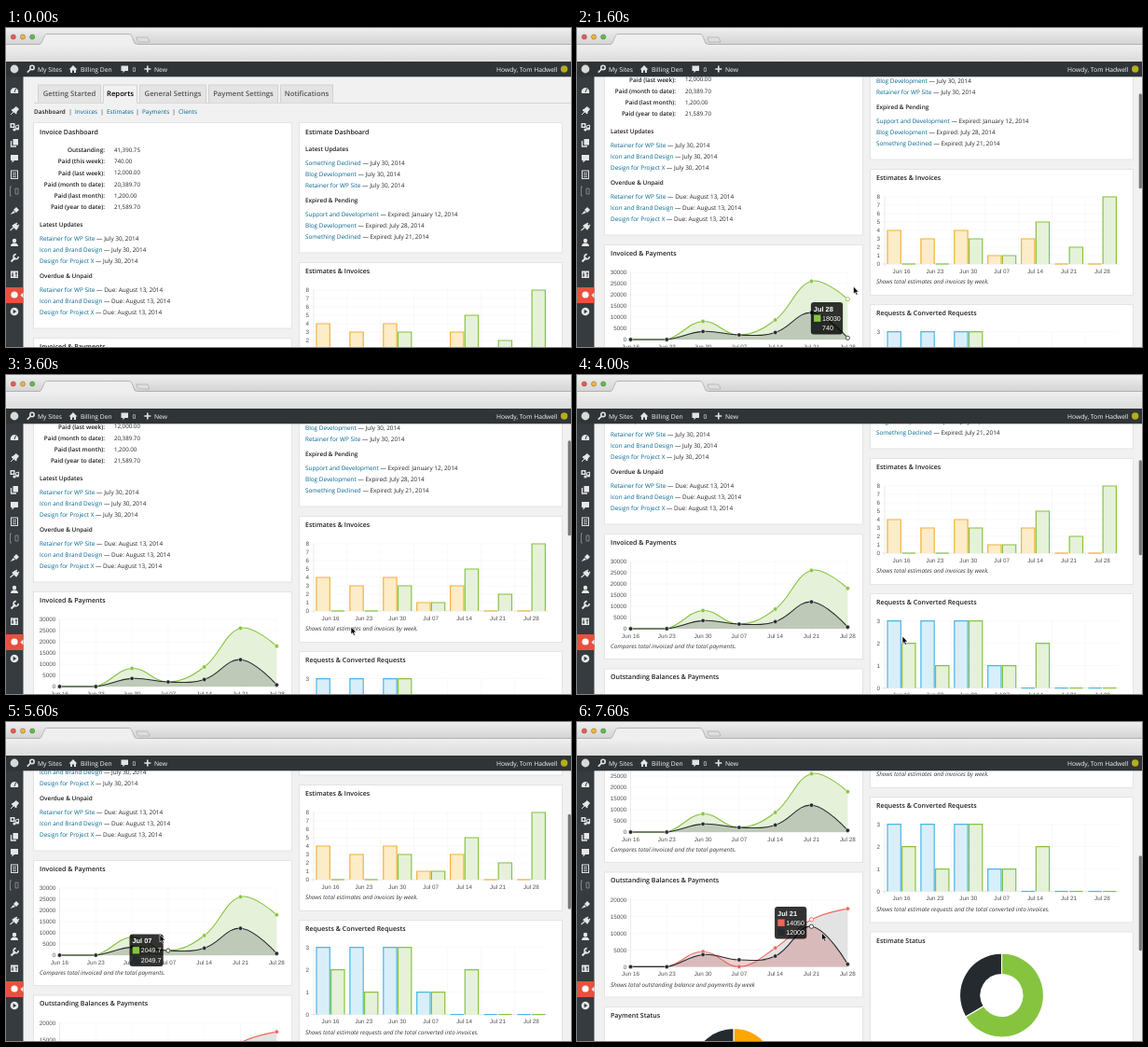
An HTML page for the animation above (8 s loop, 606 by 342 pixels).

```html
<!DOCTYPE html>
<html lang="en">
<head>
<meta charset="utf-8">
<title>Reports dashboard</title>
<style>
html, body { margin: 0; width: 100%; height: 100%; overflow: hidden; background: #f1f1f1; }
svg { display: block; width: 606px; height: 342px; }
text { font-family: "Open Sans", sans-serif; font-size: 6.4px; fill: #242424; white-space: pre; text-rendering: geometricPrecision; }
.b { font-weight: 600; fill: #1c1c1c; }
.h { font-size: 7px; font-weight: 600; fill: #1c1c1c; }
.tab { font-size: 7.7px; font-weight: 600; fill: #555; }
.on { fill: #000; }
.a { fill: #00648f; }
.i { font-style: italic; font-size: 6.3px; fill: #363636; }
.v { font-size: 6.2px; }
.bar { font-size: 6.75px; fill: #f6f6f6; }
.ax { font: 6.3px "Liberation Sans", Arial, sans-serif; fill: #505050; }
.tt { font: bold 7.4px "Liberation Sans", Arial, sans-serif; fill: #fff; }
.tr { font: 7.1px "Liberation Sans", Arial, sans-serif; fill: #fff; }
.e { text-anchor: end; }
.m { text-anchor: middle; }
</style>
</head>
<body>
<svg id="stage" viewBox="0 0 606 342"></svg>
<script>
const DARK = '#252a2f', GREEN = '#86c440', RED = '#ef675b', ORANGE = '#f0b23c', BLUE = '#4db5e4';
const PALE = { [GREEN]: '#e6f1d9', [ORANGE]: '#fdecc8', [BLUE]: '#d8effa' };
const DAYS = ['Jun 16', 'Jun 23', 'Jun 30', 'Jul 07', 'Jul 14', 'Jul 21', 'Jul 28'];
const PLOT = 72;
const SIZES = { h: 7, tab: 7.7, i: 6.3, v: 6.2, bar: 6.75, ax: 6.3, tt: 7.4, tr: 7.1 };

// y is the optical middle of the line
function text(x, y, s, cls = '') {
  const size = SIZES[cls.split(' ')[0]] || 6.4;
  return `<text x="${x}" y="${(y + size * .36).toFixed(2)}" class="${cls}">${s.replace(/&/g, '&amp;')}</text>`;
}
const rect = (x, y, w, h, fill, more = '') =>
  `<rect x="${x}" y="${y}" width="${w}" height="${h}" fill="${fill}" ${more}/>`;
const path = (d, fill, stroke = 'none', w = 1) =>
  `<path d="${d}" fill="${fill}" stroke="${stroke}" stroke-width="${w}"/>`;
const dot = (x, y, r, fill, stroke = 'none', w = 1) =>
  `<circle cx="${x}" cy="${y}" r="${r}" fill="${fill}" stroke="${stroke}" stroke-width="${w}"/>`;
const panel = (x, y, w, h, title, ty) =>
  rect(x + .5, y + .5, w - 1, h - 1, '#fff', 'stroke="#e4e4e4"') + text(x + 7, ty, title, 'h');

const paid = [0, 0, 3600, 2049.7, 3150, 12000, 740];
const charts = {
  invoiced: {
    zero: 434, top: 30000, step: 5000, sets: [
      { v: [0, 0, 8100, 2049.7, 8750, 26050, 18030], c: GREEN, fill: '#e6f1d9' },
      { v: paid, c: DARK, fill: 'rgba(37,42,47,.2)' }]
  },
  owed: {
    zero: 578.4, top: 20000, step: 5000, sets: [
      { v: [0, 0, 4500, 0, 5600, 14050, 17290], c: RED, fill: '#e3e3e3' },
      { v: paid, c: DARK, fill: 'rgba(190,80,80,.28)' }]
  },
  estimates: {
    bars: true, zero: 353, top: 8, step: 1, sets: [
      { v: [4, 3, 4, 1, 3, 0, 0], c: ORANGE }, { v: [0, 0, 3, 1, 5, 2, 8], c: GREEN }]
  },
  requests: {
    bars: true, zero: 497.6, top: 3, step: 1, sets: [
      { v: [3, 3, 3, 1, 0, 0, 0], c: BLUE }, { v: [2, 1, 3, 1, 2, 0, 0], c: GREEN }]
  }
};
const px = (c, i) => c.bars ? 348 + 35.9 * i : 57.5 + 38.8 * i;
const py = (c, v) => c.zero - v / c.top * PLOT;

function axes(c) {
  const left = c.bars ? 330 : 57.5, right = c.bars ? 581.5 : 290.3;
  const tone = first => `rgba(0,0,0,${first ? .12 : .04})`;
  let s = '';
  for (let v = 0; v <= c.top; v += c.step) {
    const y = py(c, v);
    s += path(`M${left - 3} ${y}H${right}`, 'none', tone(v === 0), .7);
    s += text(c.bars ? 325 : 53.2, y, String(v), 'ax e');
  }
  DAYS.forEach((d, i) => {
    const x = c.bars ? left + 35.9 * i : px(c, i);
    s += path(`M${x} ${c.zero - PLOT}V${c.zero + 2.5}`, 'none', tone(i === 0), .7);
    s += text(px(c, i), c.zero + 7.5, d, 'ax m');
  });
  return s;
}

// smooth line whose handles stay inside the plot
function curve(c, vals) {
  const p = vals.map((v, i) => [px(c, i), py(c, v)]);
  const clamp = y => Math.max(c.zero - PLOT, Math.min(c.zero, y));
  const handles = p.map((q, i) => {
    const a = p[i - 1] || q, b = p[i + 1] || q;
    const t = a === q || b === q ? 0 : .4;
    const da = Math.hypot(q[0] - a[0], q[1] - a[1]), db = Math.hypot(b[0] - q[0], b[1] - q[1]);
    const fa = t * da / (da + db), fb = t * db / (da + db);
    const dx = b[0] - a[0], dy = b[1] - a[1];
    return [[q[0] - fa * dx, clamp(q[1] - fa * dy)], [q[0] + fb * dx, clamp(q[1] + fb * dy)]];
  });
  return 'M' + p[0] + p.slice(1).map((q, i) => `C${handles[i][1]} ${handles[i + 1][0]} ${q}`).join('');
}

function chart(c) {
  let s = axes(c);
  c.sets.forEach((set, k) => {
    if (c.bars) {
      set.v.forEach((v, i) => {
        const x = px(c, i) + (k ? .7 : -15);
        s += path(`M${x} ${c.zero}V${py(c, v)}h14.3V${c.zero}`, PALE[set.c], set.c, 1.2);
      });
    } else {
      const d = curve(c, set.v);
      s += path(`${d}V${c.zero}H57.5Z`, set.fill) + path(d, 'none', set.c, 1.1);
      set.v.forEach((v, i) => s += dot(px(c, i), py(c, v), 2.2, set.c, '#fff', .5));
    }
  });
  return s;
}

function tip(name, i) {
  const c = charts[name], x = px(c, i), ys = c.sets.map(set => py(c, set.v[i]));
  const wide = s => [...s].reduce((w, ch) => w + (ch === '.' ? .278 : .556), 0) * SIZES.tr;
  const w = Math.max(28, ...c.sets.map(set => wide(String(set.v[i])) + 14.5));
  const left = c.bars ? x + 13.2 : x - 5.2 - w, top = (ys[0] + ys[1]) / 2 - 17.5;
  let s = '';
  if (!c.bars) c.sets.forEach((set, k) => s += dot(x, ys[k], 2.1, '#fff', set.c, .8));
  s += rect(left, top, w, 34.4, 'rgba(0,0,0,.8)', 'rx="3"') + text(left + 3, top + 7, DAYS[i], 'tt');
  c.sets.forEach((set, k) => {
    const y = top + 17.2 + k * 10.3;
    s += rect(left + 3.2, y - 3.7, 7.4, 7.4, PALE[c.bars && set.c] || set.c, c.bars ? `stroke="${set.c}" stroke-width=".8"` : '');
    s += text(left + 12.2, y, String(set.v[i]), 'tr');
  });
  return s;
}

function donut(x, y, share, first) {
  const slice = (a, b, fill) => {
    const at = (r, t) => [x + r * Math.sin(t * 2 * Math.PI), y - r * Math.cos(t * 2 * Math.PI)];
    const big = b - a > .5 ? 1 : 0;
    return path(`M${at(45, a)}A45 45 0 ${big} 1 ${at(45, b)}L${at(22.5, b)}A22.5 22.5 0 ${big} 0 ${at(22.5, a)}Z`, fill, '#fff', 1.1);
  };
  return slice(0, share, first) + slice(share, 1, DARK);
}

function list(x, y, title, rows) {
  return text(x, y, title, 'b') + rows.map(([name, rest], k) =>
    `<text x="${x}" y="${y + 17.9 + 12 * k}"><tspan class="a">${name}</tspan> — ${rest}</text>`).join('');
}

function page() {
  let s = path('M30 80.5H606', 'none', '#d2d2d2');
  [[34, 68, 'Getting Started'], [104, 37, 'Reports'], [143, 72, 'General Settings'],
   [217, 75, 'Payment Settings'], [294, 57, 'Notifications']].forEach(([x, w, name], i) => {
    const on = i === 1;
    s += rect(x + .5, 61, w - 1, on ? 20.5 : 19.5, on ? '#f1f1f1' : '#e4e4e4');
    s += path(`M${x + .5} 80V61H${x + w - .5}V80`, 'none', '#d2d2d2');
    s += text(x + w / 2, 70.5, name, 'tab m' + (on ? ' on' : ''));
  });
  s += text(30, 90, 'Dashboard', 'b');
  [[74, 'Invoices'], [108, 'Estimates'], [146, 'Payments'], [185, 'Clients']].forEach(([x, name]) =>
    s += text(x - 5, 90, '|', 'm') + text(x, 90, name, 'a'));

  s += panel(29, 101, 278, 221.5, 'Invoice Dashboard', 111);
  [['Outstanding:', '41,390.75'], ['Paid (this week):', '740.00'], ['Paid (last week):', '12,000.00'],
   ['Paid (month to date):', '20,389.70'], ['Paid (last month):', '1,200.00'], ['Paid (year to date):', '21,589.70']]
    .forEach(([name, sum], k) => s += text(106, 131 + 12.1 * k, name, 'b e') + text(116, 131 + 12.1 * k, sum, 'v'));
  const jobs = ['Retainer for WP Site', 'Icon and Brand Design', 'Design for Project X'];
  s += list(36, 210.5, 'Latest Updates', jobs.map(n => [n, 'July 30, 2014']));
  s += list(36, 265.5, 'Overdue & Unpaid', jobs.map(n => [n, 'Due: August 13, 2014']));

  s += panel(314, 101, 283, 140.5, 'Estimate Dashboard', 111);
  s += list(321, 129.5, 'Latest Updates', ['Something Declined', 'Blog Development', 'Retainer for WP Site'].map(n => [n, 'July 30, 2014']));
  s += list(321, 184.5, 'Expired & Pending', [['Support and Development', 'Expired: January 12, 2014'],
    ['Blog Development', 'Expired: July 28, 2014'], ['Something Declined', 'Expired: July 21, 2014']]);

  s += panel(314, 251, 283, 136, 'Estimates & Invoices', 260.8) + chart(charts.estimates);
  s += text(321, 372, 'Shows total estimates and invoices by week.', 'i');
  s += panel(314, 396, 283, 135.5, 'Requests & Converted Requests', 405.5) + chart(charts.requests);
  s += text(321, 516.5, 'Shows total estimate requests and the total converted into invoices.', 'i');
  s += panel(314, 540.5, 283, 140, 'Estimate Status', 550) + donut(455.5, 609, .665, GREEN);

  s += panel(29, 332, 278, 135, 'Invoiced & Payments', 341.5) + chart(charts.invoiced);
  s += text(36, 452.7, 'Compares total invoiced and the total payments.', 'i');
  s += panel(29, 476.5, 278, 135, 'Outstanding Balances & Payments', 485.7) + chart(charts.owed);
  s += text(36, 597.3, 'Shows total outstanding balance and payments by week', 'i');
  s += panel(29, 621, 278, 140, 'Payment Status', 630.4) + donut(168, 689.5, .55, '#fda604');
  return s;
}

function sidebar() {
  const g = '#e6e8e8', bg = '#363b3f';
  const at = (y, s) => `<g transform="translate(9 ${y})">${s}</g>`;
  const pin = path('M-4 4L-1 1M-3 -1L2 3L2 1L4.500 -2L2 -4.500L-1 -2Z', g, g, 1);
  return rect(0, 52, 18.5, 290, bg) +
    at(67, path('M-4 3A4.300 4.300 0 1 1 4 3Z', g) + path('M0 2L1.500 -2', 'none', bg, 1)) +
    at(89, pin) +
    at(106, rect(-4.5, -4, 5, 5, g) + dot(-2, -1.5, 1.2, bg) + dot(0, 3, 1.6, g) + dot(3.5, 2, 1.6, g) + path('M1.300 3V-1L4.600 -2V2', 'none', g, 1)) +
    at(123, rect(-1.5, -4, 5.5, 6.5, g) + path('M-3.500 -2V4H2', 'none', g, 1.3)) +
    at(140, path('M-4 -4H4V2H0L-2.500 4.500V2H-4Z', g)) +
    at(157, rect(-3.5, -4, 7, 8.5, 'none', `stroke="${g}"`) + path('M-2 -1.500H2M-2 .5H2M-2 2.500H2', 'none', g, .8)) +
    at(175, path('M-3 -5H-4.500V5H-3M1 -3H4V3H1Z', 'none', '#8b8e90', .9)) +
    at(196, path('M-4.500 4L-1 0L1 2ZM-1 -1L2 -4L5 -1L2 2Z', g)) +
    at(213, path('M-4.500 4L-1 1M-2 -1L2 3L4 0L1 -3ZM1 -2L3 -4M3 0L5 -2', g, g, 1.1)) +
    at(230, dot(0, -2, 2.2, g) + path('M-4 4Q-4 .5 0 .5T4 4Z', g)) +
    at(247, path('M-3.500 3.500L1 -1', 'none', g, 2.2) + path('M4.200 -2A2.600 2.600 0 1 1 1.700 -4.400', 'none', g, 1.6)) +
    at(264, rect(-4, -3.5, 8, 7.5, g) + path('M-2 -2V3M2 -2V3M-3.300 1H-.7M.7 -1H3.300', 'none', bg, .9)) +
    rect(0, 278, 18.5, 17, '#e8503f') + dot(9, 286, 3.6, '#fff') + path('M18.500 283.500L15.500 286.500L18.500 289.500Z', '#f1f1f1') +
    at(304, dot(0, 0, 4.3, g) + path('M-1.300 -2.200L2.300 0L-1.300 2.200Z', bg));
}

function frameTop() {
  const g = '#e2e4e4';
  let s = rect(0, 0, 606, 18, 'url(#strip)') + rect(0, 18, 606, 18, 'url(#tools)');
  s += path('M0 17.500H36Q38 17 39.500 13L41 9Q42 6.500 44 6.500H132Q134 6.500 135 9L137 14Q138 17.500 141 17.500H606', 'none', '#a9a9a9', .8);
  s += path('M36.500 18Q38.500 17 39.700 13.500L41.300 9.500Q42 7 44 7H132Q134 7 134.700 9.500L136.500 14.500Q137.500 18 141 18Z', '#efefef');
  s += path('M140 10H151Q152 10 152.500 11L154 15H143Q141.500 15 141 13.500Z', '#dedede', '#aaa', .7);
  ['#ee5b52', '#f2b63c', '#5fbf4a'].forEach((c, k) => s += dot(7.8 + 10.2 * k, 9.5, 2.6, c, 'rgba(0,0,0,.35)', .7));
  s += rect(0, 36, 606, 16.3, '#2f3437') + dot(9, 44, 4.4, '#d8dada');
  s += dot(28, 42.5, 2.2, 'none', g, 1.6) + path('M26.500 44L22.800 47.700', 'none', g, 1.7);
  s += path('M67.500 44.500L72 40L76.500 44.500H75V48H73V45.500H71V48H69V44.500Z', g);
  s += path('M123.500 40.500H131V46H127.500L125.500 48.300V46H123.500Z', g);
  s += path('M148.300 44H155.300M151.800 40.500V47.500', 'none', g, 1.6);
  s += text(34, 44.3, 'My Sites', 'bar') + text(80, 44.3, 'Billing Den', 'bar') + text(135.5, 44.3, '0', 'bar') + text(159, 44.3, 'New', 'bar');
  s += text(591.5, 44.3, 'Howdy, Tom Hadwell', 'bar e') + dot(598.7, 44, 3.7, '#b5ae1c');
  return s;
}

const stage = document.getElementById('stage');
stage.innerHTML = `<defs>
<linearGradient id="strip" x2="0" y2="1"><stop stop-color="#eee"/><stop offset="1" stop-color="#d3d3d3"/></linearGradient>
<linearGradient id="tools" x2="0" y2="1"><stop stop-color="#efefef"/><stop offset="1" stop-color="#dcdcdc"/></linearGradient>
</defs>${rect(0, 0, 606, 342, '#f1f1f1')}
<g id="doc">${page()}<g id="tip"></g></g>
${rect(602.7, 0, 3.2, 102, 'rgba(0,0,0,.5)', 'id="thumb" rx="1.6"')}
${sidebar()}${frameTop()}
<path id="arrow" d="M0 0V8L1.800 6.400L3.100 9.300L4.500 8.700L3.200 5.900H5.600Z" fill="#000" stroke="#fff" stroke-width=".6"/>`;
const [doc, tipBox, thumb, arrow] = ['doc', 'tip', 'thumb', 'arrow'].map(id => document.getElementById(id));

// scroll, pointer x, pointer y, chart, day: one row per 400 ms
const steps = [
  [0], [0, 60, 228], [10, 60, 228], [70, 180, 255],
  [100, 296.5, 277, 'invoiced', 6], [100, 426, 219], [100, 470, 304], [100, 380, 237, 'estimates', 1],
  [100, 414, 230, 'estimates', 2], [100, 370, 270], [162, 349, 280], [184, 349, 280],
  [184, 286, 184, 'invoiced', 6], [184, 171, 236, 'invoiced', 3], [184, 165, 228, 'invoiced', 3], [184, 346.5, 272, 'requests', 0],
  [184, 349, 273, 'requests', 0], [294, 349, 273], [316, 172, 118, 'invoiced', 3], [316, 262.5, 226, 'owed', 5]
];
let shown = -1;
function draw(now) {
  const k = Math.floor(now % 8000 / 400);
  if (k !== shown) {
    shown = k;
    const [scroll, x, y, name, day] = steps[k];
    doc.setAttribute('transform', `translate(0 ${-scroll})`);
    thumb.setAttribute('y', 36.5 + scroll * .338);
    thumb.style.display = scroll ? '' : 'none';
    arrow.style.display = x ? '' : 'none';
    arrow.setAttribute('transform', `translate(${x || 0} ${y || 0})`);
    tipBox.innerHTML = name ? tip(name, day) : '';
  }
  requestAnimationFrame(draw);
}
draw(performance.now());
</script>
</body>
</html>
```
